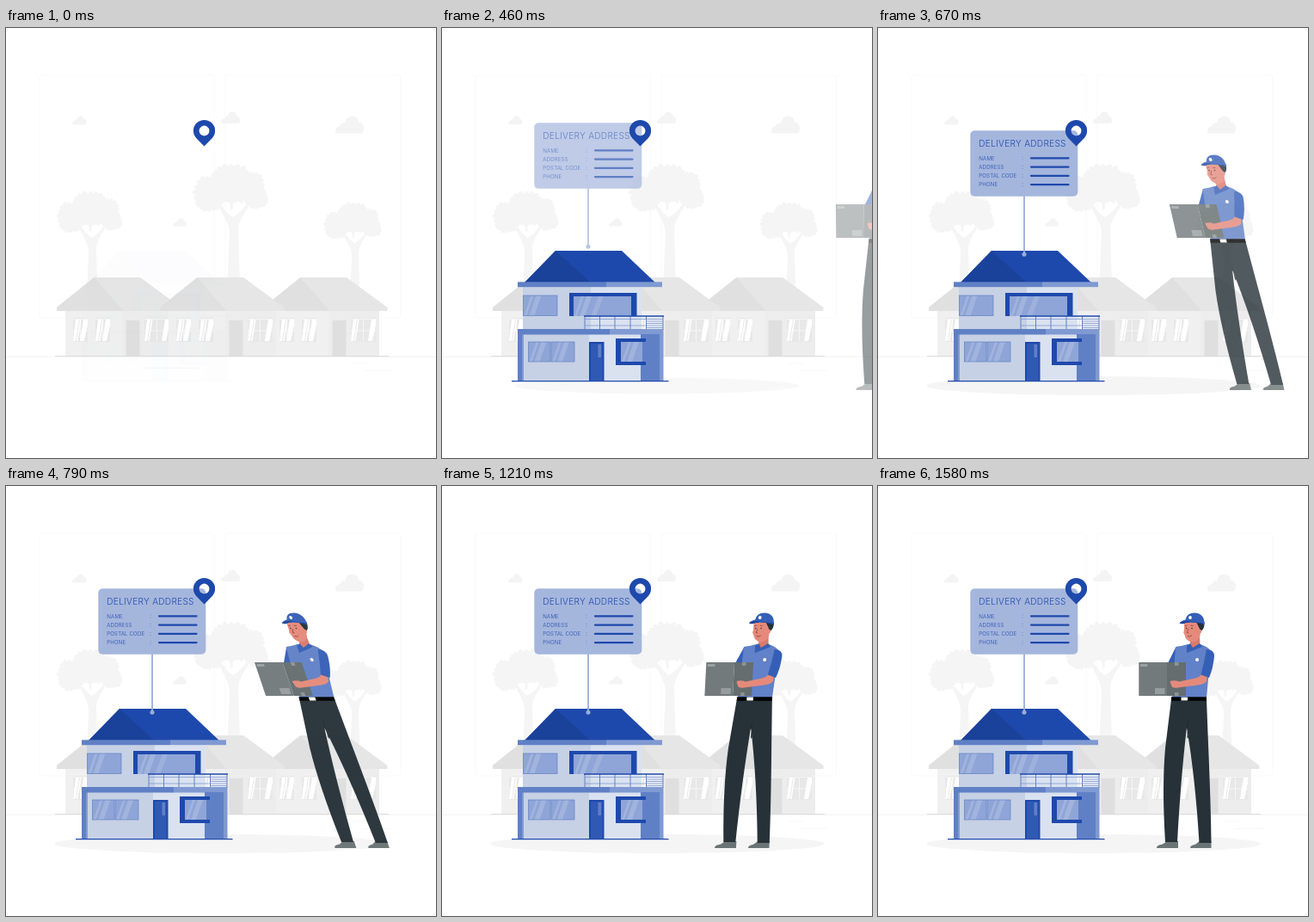
These frames come from a looping animation (500 px wide and 500 px high, 1620 ms). An HTML page:

```html
<!DOCTYPE html>
<html lang="en">
<head>
<meta charset="utf-8">
<title>Delivery address</title>
<style>
  html, body { margin: 0; width: 100%; height: 100%; overflow: hidden; background: #fff; }
  svg { display: block; width: 100vw; height: 100vh; }
  text { font-family: Inter, "Open Sans", sans-serif; font-weight: 300; fill: #1e49ac; letter-spacing: .03em; }
</style>
</head>
<body>
<svg id="stage" viewBox="0 0 500 500">
  <g id="scenery"></g>
  <ellipse id="shadow" cx="250.5" cy="416" rx="194.5" ry="11" fill="#f5f5f5"/>
  <g id="house"></g>
  <g id="card"></g>
  <path fill="#1e49ac" fill-rule="evenodd" d="M221.6 128.4A12.6 12.6 0 1 1 239.4 128.4L230.5 137.4ZM230.5 113.6a5.9 5.9 0 1 0 .01 0Z"/>
  <g id="man"></g>
</svg>
<script>
const LOOP = 1620;
const $ = id => document.getElementById(id);
const rect = (x, y, x2, y2, fill, extra = '') =>
  `<rect x="${x}" y="${y}" width="${x2 - x}" height="${y2 - y}" fill="${fill}" ${extra}/>`;
const path = (d, fill, extra = '') => `<path d="${d}" fill="${fill}" ${extra}/>`;
const line = (d, stroke, width, extra = '') =>
  `<path d="${d}" fill="none" stroke="${stroke}" stroke-width="${width}" ${extra}/>`;
const dot = (x, y, r, fill) => `<circle cx="${x}" cy="${y}" r="${r}" fill="${fill}"/>`;
const place = (x, y, s, body) => `<g transform="translate(${x} ${y}) scale(${s})">${body}</g>`;

const C = {
  deep: '#1e49ac', dark: '#1b429a', mid: '#6080c6', soft: '#809ad2',
  wallL: '#c7d1e5', wallR: '#dae2f0', glass: '#8fa5d7', gleam: '#b4c3e3',
  skin: '#e58a7b', shirt: '#6181c8', sleeve: '#355fb6', ink: '#263238'
};

// ---- scenery ----
function tree() {
  const lobes = [[234, 191, 14, 17], [262, 171, 20, 11], [285, 182, 14, 13],
                 [262, 188, 30, 15], [291, 198, 12, 10], [236, 203, 13, 8]];
  let out = path('M257 300L260 240Q260 228 246 206L250 205Q258 217 264 220Q274 214 280 204' +
    'L283 206Q272 222 270 232L272 300ZM260 200h3l1 10-3 3Z', '#f5f5f5');
  for (const [x, y, rx, ry] of lobes) {
    out += `<ellipse cx="${x}" cy="${y}" rx="${rx}" ry="${ry}" fill="#f5f5f5"/>`;
    for (let i = 0; i < 16; i++) {
      const a = i * Math.PI / 8;
      out += dot((x + rx * Math.cos(a)).toFixed(1), (y + ry * Math.sin(a)).toFixed(1), 2 + i % 3 * .5, '#f5f5f5');
    }
  }
  return out;
}

function greyWindow(x, w) {
  const r = x + w, m = x + w / 2;
  return rect(x, 337, r, 365, '#e8e8e8') +
    line(`M${x} 338.5H${r}M${x} 352H${r}M${m} 338V364`, '#f5f5f5', 1) +
    path(`M${x + 3} 339h4l-4 25h-3ZM${x + 8} 339h1.5l-4 25h-1.5ZM${r - 5} 339h5v6l-4 19h-5Z`, '#fff');
}

const greyHouse = x => place(x, 0, 1,
  rect(69, 327, 135, 382, '#f0f0f0') + rect(135, 327, 194, 382, '#ededed') +
  path('M102.5 290H156L203.5 325V329H59V325Z', '#e6e6e6') +
  path('M102.5 290L136 329H59V325Z', '#e0e0e0') +
  greyWindow(78, 17) + greyWindow(104, 17) + greyWindow(161, 29) +
  rect(139.5, 340, 155.5, 382, '#dfdfdf'));

const cloud = (x, y, s) => place(x, y, s,
  path('M0 18Q0 12 5 12Q7 7 11 8Q13 0 20 0Q27 1 27 7Q33 8 33 14Q33 20 29 20H3Q0 20 0 18Z', '#f4f4f4'));

$('scenery').innerHTML =
  [39, 255].map(x => `<rect x="${x}" y="55" width="203.5" height="282" rx="2" fill="none" stroke="#f7f7f7" stroke-width=".7"/>`).join('') +
  line('M0 382.2H500', '#ebebeb', .7) +
  line('M161 395.3H225M415 398.4H448M402 390H420', '#f5f5f5', .7) +
  cloud(383, 102.5, 1) + cloud(77, 102.3, .5) + cloud(250, 97.6, .67) + cloud(194, 221, .48) +
  place(-130, 52.4, .87, tree()) + place(0, 0, 1, tree()) + place(202, 81, .77, tree()) +
  [0, 240, 120].map(greyHouse).join('') + line('M57 381.6H445', '#dcdcdc', 1);

// ---- blue house ----
function glass(x, y, x2, y2, lean = 8) {
  const h = y2 - y, streak = (s, w) => `M${s + lean} ${y}h${w}l${-lean} ${h}h${-w}Z`;
  return rect(x, y, x2, y2, C.glass) + path(streak(x + 1, 3) + streak(x + 7, 6), C.gleam, 'opacity=".5"');
}
const framed = (x, y, x2, y2) => glass(x, y, x2, y2) + rect(x, y, x2, y2, 'none', `stroke="${C.mid}" stroke-width=".7"`);

$('house').innerHTML =
  rect(94, 300, 173, 351, C.wallL) + rect(173, 300, 232, 351, C.wallR) +
  path('M96 296L132 259H209L248 296Z', C.deep) + path('M132 259L173 296H96Z', C.dark) +
  rect(88, 295.3, 191, 301.2, C.mid) + rect(191, 295.3, 256, 301.2, C.soft) +
  framed(94.5, 311, 134, 334.5) +
  rect(148, 308, 226.5, 335, C.deep) + glass(153, 312, 220, 335) +
  path('M182 312h6l-9 23h-6Z', C.gleam, 'opacity=".4"') +
  rect(237.5, 336, 257, 350, '#e4eaf5', 'opacity=".6"') +
  line('M166 338.5H257M166 346H257M237.5 341H257M237.5 343.5H257M237.5 348.5H257', C.soft, .8) +
  line('M166 335V351M183.5 335V351M201 335V351M219 335V351M237.5 335V351M257 335V351', C.mid, 1) +
  line('M165 335H258', C.deep, 1.3) +
  rect(95, 356, 171, 411, C.wallL) + rect(171, 356, 232, 411, C.wallR) +
  rect(88, 350, 195, 356.5, C.mid) + rect(195, 350, 257.5, 356.5, C.soft) +
  rect(88, 356, 95, 411, C.mid) + rect(93, 356.5, 95, 411, C.soft) +
  rect(231, 356, 253, 411, C.mid) + rect(253, 356, 257.5, 411, C.soft) +
  framed(100.5, 365, 126, 388) + framed(127, 365, 154, 388) +
  rect(171, 365, 188.5, 411, C.deep) + rect(173, 367, 186.5, 411, '#3059b4') + rect(181.5, 368, 185, 383, C.mid) +
  glass(208, 365, 233, 388) +
  path('M202 361H237V365H208V388H237V392H202Z', C.deep) +
  line('M81 410.6H263.5', C.deep, 1.3);

// ---- address card ----
const rows = ['NAME', 'ADDRESS', 'POSTAL CODE', 'PHONE'];
$('card').innerHTML =
  line('M170 195V263', '#98aedb', 1.8) + dot(170, 263.2, 2.5, '#98aedb') +
  rect(107.3, 119.2, 232.3, 195.8, '#a5b6dd', 'rx="5"') +
  '<text x="117.3" y="137.9" font-size="10.1">DELIVERY ADDRESS</text>' +
  rows.map((label, i) => {
    const y = 151.3 + i * 10.25;
    return `<text x="117.3" y="${y + 2.2}" font-size="6.1">${label}</text>` +
      dot(168, y - 1.2, .5, C.mid) + dot(168, y + 1.7, .5, C.mid) +
      line(`M178 ${y}H221.5`, C.deep, 2.3, 'stroke-linecap="round"');
  }).join('');

// ---- courier ----
$('man').innerHTML =
  path('M324 420.8Q324 417.5 331 416.5L336 413H349V421H324ZM363 421Q363 417.8 369 416.8L374 413H387.5V421Z', '#6b7474') +
  path('M341 248H382L384 300Q387 370 387.5 415H373.5Q369 340 359 281Q352 340 348 414H334Q330 350 334 305Z', C.ink) +
  path('M359 281L361 268Q358 300 361 292Z', '#1d272c') +
  path('M346 188L337 206H350L354 190Z', C.sleeve) +
  path('M346 187Q354 186 360 184H375Q384 187 387 192L382 246H342L344 215Z', C.shirt) +
  rect(341, 245.3, 382, 249.7, '#000') + rect(352.5, 245.6, 360, 249.4, '#fff') +
  path('M363 174H374L374.5 186Q369 192 363 188Z', '#d97a6c') +
  path('M356 159H375V170Q375 180 366 181.5Q358 181 356.5 173L355.2 170.5L356 167Z', C.skin) +
  path('M370 158H379.5Q380 166 375.5 169L373 164Z', C.ink) + dot(374, 169, 2.3, C.skin) +
  dot(358.6, 165.5, .8, C.ink) + dot(365, 165.5, .8, C.ink) +
  line('M357 162.8l2.5-.6M363.5 162.2l3 .5M361 166l-1.7 4.5 2 .4M360 174.5q3 1.5 5-.8', '#8c3f3c', .8) +
  path('M358 159Q355 161 350.5 159.5Q352 157 357.5 155.5Q359 147.5 368 147.5Q380 148 379.5 161Q368 157.5 358 159Z', C.sleeve) +
  path('M350.5 159.5Q354 156.5 360 157L378 159.5V161Q366 157.5 358 159Q355 161 350.5 159.5Z', C.dark) +
  dot(363, 153, 1.9, '#fff') +
  path('M359 186L363 183L366 188L374 183L377 187L367 191L359 194Z', C.sleeve) +
  dot(371, 202, 2, '#fff') +
  rect(303.3, 205, 336, 244, '#737a7b') + rect(336, 205, 358, 244, '#656d6e') +
  rect(305, 207, 313.5, 210, '#9aa0a0') + rect(322, 235, 333.5, 242, '#979d9d') +
  rect(345, 205, 349.5, 209, '#8c9393') + rect(345, 240, 349.5, 244, '#8c9393') +
  path('M383 219L382 227Q380 230 372 231.5L352 234Q343 236 341.5 233L339.5 227Q345 225.5 350 227.5L369 223.5Q375 222 376.5 218Z', C.skin) +
  path('M382 190Q391 190 391 198Q390 211 385 223L375.5 219.5L379 205Z', C.sleeve);

// ---- motion ----
// Smooth monotone curve through [time, value] points.
function track(points) {
  const slope = i => (points[i + 1][1] - points[i][1]) / (points[i + 1][0] - points[i][0]);
  const last = points.length - 1;
  const tangent = points.map((_, i) => {
    if (i === 0) return slope(0);
    if (i === last) return 0;
    const a = slope(i - 1), b = slope(i);
    return a * b <= 0 ? 0 : 2 * a * b / (a + b);
  });
  return t => {
    if (t <= points[0][0]) return points[0][1];
    if (t >= points[last][0]) return points[last][1];
    const i = points.findIndex(p => p[0] > t) - 1;
    const h = points[i + 1][0] - points[i][0], u = (t - points[i][0]) / h, v = 1 - u;
    return v * v * (1 + 2 * u) * points[i][1] + u * u * (3 - 2 * u) * points[i + 1][1] +
      h * u * v * (v * tangent[i] - u * tangent[i + 1]);
  };
}

const slide = track([[80, 300], [460, 156], [670, 54], [850, 2], [900, 0]]);
const fade = track([[80, 0], [460, .47], [670, .8], [850, 1]]);
const lean = track([[80, -.36], [460, .012], [670, .228], [860, .364], [960, .31],
                    [1150, .025], [1210, -.051], [1280, -.07], [1580, 0]]);
const clamp = v => Math.min(1, Math.max(0, v));
const PIVOT = 284;

function draw(t) {
  $('house').setAttribute('opacity', t < 80 ? .008 : clamp((t - 45) / 350));

  const p = clamp((t - 110) / 500);
  $('card').setAttribute('opacity', p);
  $('card').setAttribute('transform', `translate(0 ${-30 * (1 - p)})`);

  const s = .5 + p / 2;
  $('shadow').setAttribute('opacity', p);
  $('shadow').setAttribute('transform', `translate(${250.5 * (1 - s)} ${416 * (1 - s)}) scale(${s})`);

  const k = lean(t);
  $('man').setAttribute('opacity', fade(t));
  $('man').setAttribute('transform', `matrix(1 0 ${k} 1 ${slide(t) - k * PIVOT} 0)`);
}

const start = performance.now();
function tick() {
  draw((performance.now() - start) % LOOP);
  requestAnimationFrame(tick);
}
draw(0);
requestAnimationFrame(tick);
</script>
</body>
</html>
```
